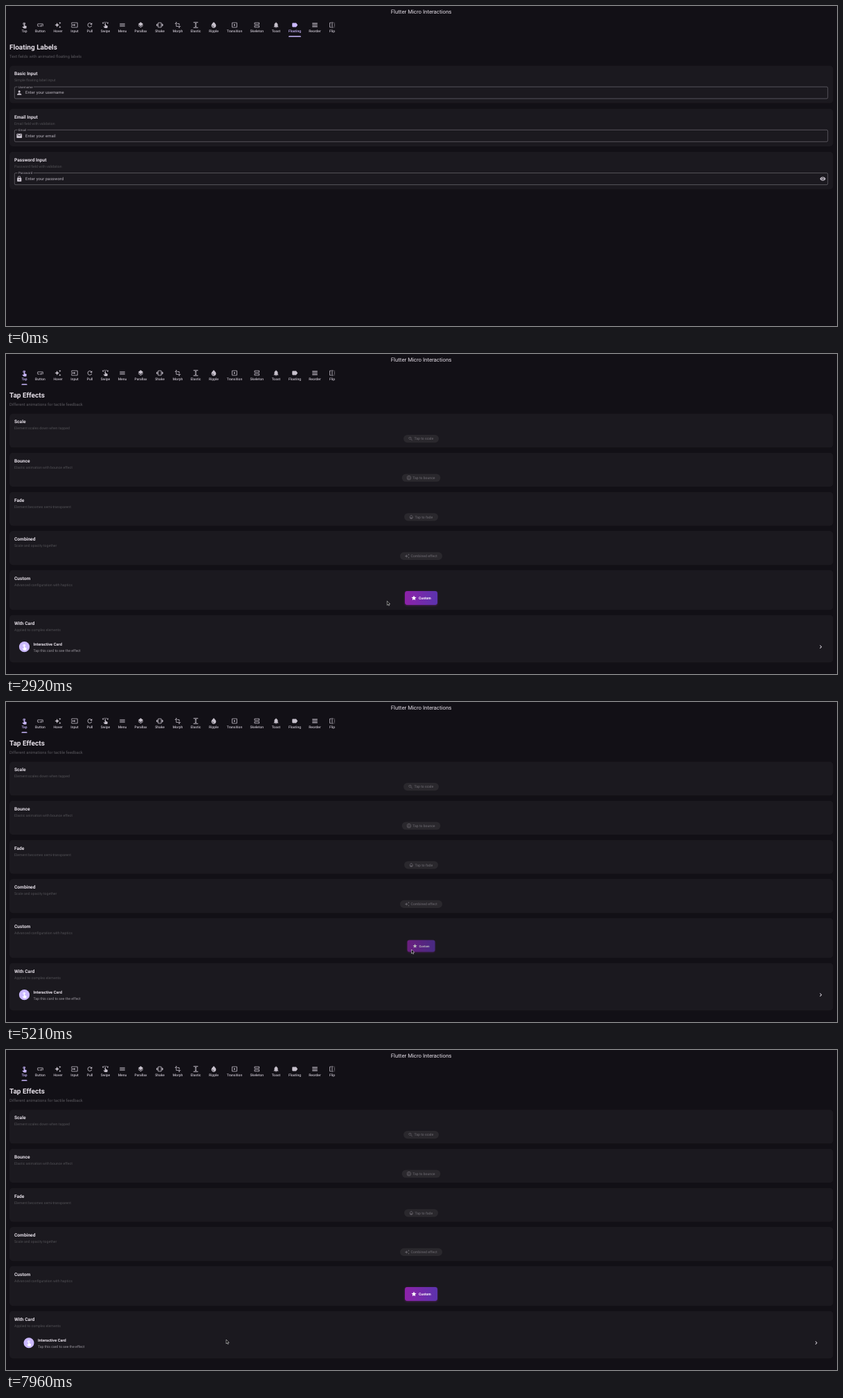
Animation of 1200 by 463 pixels, one loop 8 s. Source, as an HTML page:

```html
<!DOCTYPE html>
<html lang="en">
<head>
<meta charset="utf-8">
<title>Flutter Micro Interactions</title>
<style>
  html, body { margin: 0; height: 100%; overflow: hidden; background: #121016; }
  svg { display: block; width: 100vw; height: 100vh; font-family: Roboto, "Noto Sans", sans-serif; text-rendering: geometricPrecision; }
  path { fill-rule: evenodd; }
  .card { fill: #1b191f; filter: drop-shadow(0 .4px .6px #0006); }
</style>
</head>
<body>
<svg id="stage" viewBox="0 0 1200 463"></svg>
<script>
const PRIMARY = '#cbb9ff', SOFT = '#c6c0cb', LIGHT = '#e6e0e9', CARD = '#1b191f';

// 24-unit icon outlines
const ICONS = {
  touch: 'M9 11.24V7.5C9 6.12 10.12 5 11.5 5S14 6.12 14 7.5v3.74c1.21-.81 2-2.18 2-3.74C16 5.01 13.99 3 11.5 3S7 5.01 7 7.5c0 1.56.79 2.93 2 3.74zm9.84 4.63l-4.54-2.26c-.17-.07-.35-.11-.54-.11H13v-6c0-.83-.67-1.5-1.5-1.5S10 6.67 10 7.5v10.74l-3.43-.72c-.08-.01-.15-.03-.24-.03-.31 0-.59.13-.79.33l-.79.8 4.94 4.94c.27.27.65.44 1.06.44h6.79c.75 0 1.33-.55 1.44-1.28l.75-5.27c.01-.07.02-.14.02-.2 0-.62-.38-1.16-.91-1.38z',
  button: 'M22 9v6c0 1.1-.9 2-2 2h-1v-2h1V9H4v6h6v2H4c-1.1 0-2-.9-2-2V9c0-1.1.9-2 2-2h16c1.1 0 2 .9 2 2zm-7.5 10 1.09-2.41L18 15.5l-2.41-1.09L14.5 12l-1.09 2.41L11 15.5l2.41 1.09L14.5 19zm2.5-5 .62-1.38L19 12l-1.38-.62L17 10l-.62 1.38L15 12l1.38.62L17 14z',
  sparkle: 'M19 9l1.25-2.75L23 5l-2.75-1.25L19 1l-1.25 2.75L15 5l2.75 1.25L19 9zm-7.5.5L9 4 6.5 9.5 1 12l5.5 2.5L9 20l2.5-5.5L17 12l-5.5-2.5zM19 15l-1.25 2.75L15 19l2.75 1.25L19 23l1.25-2.75L23 19l-2.75-1.25L19 15z',
  input: 'M21 3H3c-1.1 0-2 .9-2 2v4h2V5h18v14H3v-4H1v4c0 1.1.9 2 2 2h18c1.1 0 2-.9 2-2V5c0-1.1-.9-2-2-2zM11 16l4-4-4-4v3H1v2h10v3z',
  refresh: 'M17.65 6.35C16.2 4.9 14.21 4 12 4c-4.42 0-7.99 3.58-7.99 8s3.57 8 7.99 8c3.73 0 6.84-2.55 7.73-6h-2.08c-.82 2.33-3.04 4-5.65 4-3.31 0-6-2.69-6-6s2.69-6 6-6c1.66 0 3.14.69 4.22 1.78L13 11h7V4l-2.35 2.35z',
  swipe: 'M18.89 14.75l-4.09-2.04c-.28-.14-.58-.21-.89-.21H13v-6C13 5.67 12.33 5 11.5 5S10 5.67 10 6.5v10.74l-3.25-.74c-.33-.07-.68.03-.92.28l-.83.84 4.54 4.79c.38.38 1.14.59 1.67.59h6.16c1 0 1.84-.73 1.98-1.72l.63-4.46c.12-.85-.32-1.68-1.09-2.07zM20.13 3.87C18.69 2.17 15.6 1 12 1S5.31 2.17 3.87 3.87L2 2v5h5L4.93 4.93c1-1.29 3.7-2.43 7.07-2.43s6.07 1.14 7.07 2.43L17 7h5V2l-1.87 1.87z',
  menu: 'M3 18h18v-2H3v2zm0-5h18v-2H3v2zm0-7v2h18V6H3z',
  layers: 'M11.99 18.54l-7.37-5.73L3 14.07l9 7 9-7-1.63-1.27-7.38 5.74zM12 16l7.36-5.73L21 9l-9-7-9 7 1.63 1.27L12 16z',
  shake: 'M0 15h2V9H0v6zm3 2h2V7H3v10zm19-8v6h2V9h-2zm-3 8h2V7h-2v10zM16.5 3h-9C6.67 3 6 3.67 6 4.5v15c0 .83.67 1.5 1.5 1.5h9c.83 0 1.5-.67 1.5-1.5v-15c0-.83-.67-1.5-1.5-1.5zM16 19H8V5h8v14z',
  morph: 'M22 18v-2H8V4h2L7 1 4 4h2v2H2v2h4v8c0 1.1.9 2 2 2h8v2h-2l3 3 3-3h-2v-2h4zM10 8h6v6h2V8c0-1.1-.9-2-2-2h-6v2z',
  expand: 'M4 20h16v2H4zM4 2h16v2H4zm9 7h3l-4-4-4 4h3v6H8l4 4 4-4h-3z',
  drop: 'M12 2c-5.33 4.55-8 8.48-8 11.8 0 4.98 3.8 8.2 8 8.2s8-3.22 8-8.2c0-3.32-2.67-7.25-8-11.8zM7.83 14c.37 0 .67.26.74.62.41 2.22 2.28 2.98 3.64 2.87.43-.02.79.32.79.75 0 .4-.32.73-.72.75-2.13.13-4.62-1.09-5.19-4.12-.08-.45.28-.87.74-.87z',
  slides: 'M10 8v8l5-4-5-4zm9-5H5c-1.1 0-2 .9-2 2v14c0 1.1.9 2 2 2h14c1.1 0 2-.9 2-2V5c0-1.1-.9-2-2-2zm0 16H5V5h14v14z',
  agenda: 'M19 13H5c-1.1 0-2 .9-2 2v4c0 1.1.9 2 2 2h14c1.1 0 2-.9 2-2v-4c0-1.1-.9-2-2-2zm0 6H5v-4h14v4zm0-16H5c-1.1 0-2 .9-2 2v4c0 1.1.9 2 2 2h14c1.1 0 2-.9 2-2V5c0-1.1-.9-2-2-2zm0 6H5V5h14v4z',
  bell: 'M12 22c1.1 0 2-.9 2-2h-4c0 1.1.89 2 2 2zm6-6v-5c0-3.07-1.64-5.64-4.5-6.32V4c0-.83-.67-1.5-1.5-1.5s-1.5.67-1.5 1.5v.68C7.63 5.36 6 7.92 6 11v5l-2 2v1h16v-1l-2-2z',
  label: 'M17.63 5.84C17.27 5.33 16.67 5 16 5H5C3.9 5 3 5.9 3 7v10c0 1.1.9 2 2 2h11c.67 0 1.27-.33 1.63-.84L22 12l-4.37-6.16z',
  reorder: 'M3 15h18v-2H3v2zm0 4h18v-2H3v2zm0-8h18V9H3v2zm0-6v2h18V5H3z',
  flip: 'M15 21h2v-2h-2v2zm4-12h2V7h-2v2zM3 5v14c0 1.1.9 2 2 2h4v-2H5V5h4V3H5c-1.1 0-2 .9-2 2zm16-2v2h2c0-1.1-.9-2-2-2zm-8 20h2V1h-2v22zm8-6h2v-2h-2v2zM15 5h2V3h-2v2zm4 8h2v-2h-2v2zm0 8c1.1 0 2-.9 2-2h-2v2z',
  person: 'M12 12c2.21 0 4-1.79 4-4s-1.79-4-4-4-4 1.79-4 4 1.79 4 4 4zm0 2c-2.67 0-8 1.34-8 4v2h16v-2c0-2.66-5.33-4-8-4z',
  mail: 'M20 4H4c-1.1 0-2 .9-2 2v12c0 1.1.9 2 2 2h16c1.1 0 2-.9 2-2V6c0-1.1-.9-2-2-2zm0 4l-8 5-8-5V6l8 5 8-5v2z',
  lock: 'M18 8h-1V6c0-2.76-2.24-5-5-5S7 3.24 7 6v2H6c-1.1 0-2 .9-2 2v10c0 1.1.9 2 2 2h12c1.1 0 2-.9 2-2V10c0-1.1-.9-2-2-2zm-6 9c-1.1 0-2-.9-2-2s.9-2 2-2 2 .9 2 2-.9 2-2 2zm3.1-9H8.9V6c0-1.71 1.39-3.1 3.1-3.1 1.71 0 3.1 1.39 3.1 3.1v2z',
  eye: 'M12 4.5C7 4.5 2.73 7.61 1 12c1.73 4.39 6 7.5 11 7.5s9.27-3.11 11-7.5c-1.73-4.39-6-7.5-11-7.5zM12 17c-2.76 0-5-2.24-5-5s2.24-5 5-5 5 2.24 5 5-2.24 5-5 5zm0-8c-1.66 0-3 1.34-3 3s1.34 3 3 3 3-1.34 3-3-1.34-3-3-3z',
  zoom: 'M15.5 14h-.79l-.28-.27C15.41 12.59 16 11.11 16 9.5 16 5.91 13.09 3 9.5 3S3 5.91 3 9.5 5.91 16 9.5 16c1.61 0 3.09-.59 4.23-1.57l.27.28v.79l5 4.99L20.49 19l-4.99-5zm-6 0C7.01 14 5 11.99 5 9.5S7.01 5 9.5 5 14 7.01 14 9.5 11.99 14 9.5 14zM7 9h5v1H7z',
  ball: 'M12 2a10 10 0 1 0 0 20 10 10 0 1 0 0-20zm0 2a8 8 0 1 1 0 16 8 8 0 1 1 0-16zM11 4h2v16h-2zM4 11h7v2H4zM13 11h7v2h-7z',
  opacity: 'M17.66 8L12 2.35 6.34 8C4.78 9.56 4 11.64 4 13.64s.78 4.11 2.34 5.67 3.61 2.35 5.66 2.35 4.1-.79 5.66-2.35S20 15.64 20 13.64 19.22 9.56 17.66 8zM6 14c.01-2 .62-3.27 1.76-4.4L12 5.27l4.24 4.38C17.38 10.77 17.99 12 18 14H6z',
  star: 'M12 17.27L18.18 21l-1.64-7.03L22 9.24l-7.19-.61L12 2 9.19 8.63 2 9.24l5.46 4.73L5.82 21z',
  chevron: 'M10 6L8.59 7.41 13.17 12l-4.58 4.59L10 18l6-6z'
};

const TABS = [
  ['Tap', 'touch', 26.5], ['Button', 'button', 49.5], ['Hover', 'sparkle', 75], ['Input', 'input', 99],
  ['Pull', 'refresh', 121], ['Swipe', 'swipe', 143.5], ['Menu', 'menu', 168], ['Parallax', 'layers', 194.5],
  ['Shake', 'shake', 222], ['Morph', 'morph', 248], ['Elastic', 'expand', 274], ['Ripple', 'drop', 300],
  ['Transition', 'slides', 330], ['Skeleton', 'agenda', 362.3], ['Toast', 'bell', 390], ['Floating', 'label', 417],
  ['Reorder', 'reorder', 446], ['Flip', 'flip', 471]
];

// Markup helpers
const icon = (name, x, y, size, fill = '') =>
  `<path d="${ICONS[name]}" ${fill && `fill="${fill}"`} transform="translate(${x - size / 2} ${y - size / 2}) scale(${size / 24})"/>`;
const text = (str, x, y, size, fill, weight = 400, extra = '') =>
  `<text x="${x}" y="${y}" font-size="${size}" ${fill && `fill="${fill}"`} font-weight="${weight}" ${extra}>${str}</text>`;
const rect = (x, y, w, h, r, attrs) =>
  `<rect x="${x}" y="${y}" width="${w}" height="${h}" rx="${r}" ${attrs}/>`;
const MIDDLE = 'text-anchor="middle"';

const heading = (title, sub) =>
  text(title, 5, 62.8, 10.05, LIGHT, 600) + text(sub, 5, 75.1, 5.92, '#5a585e');
const card = (y, h, title, sub) =>
  rect(5, y, 1189.5, h, 5, 'class="card"') +
  text(title, 12, y + 14.1, 6.66, LIGHT, 600) + text(sub, 12, y + 23.2, 5.2, '#515055');

const field = (i, name, sub, label, hint, glyph) => {
  const y = 86.2 + i * 62.3;
  return card(y, 54.6, name, sub) +
    rect(12.3, y + 30.8, 1174.4, 17, 1.7, 'fill="none" stroke="#7f7b84" stroke-width=".6"') +
    text(label, 18, y + 32.4, 4.45, '#a9a4ae', 400, `letter-spacing=".08" stroke="${CARD}" stroke-width="3" paint-order="stroke"`) +
    icon(glyph, 19.2, y + 39.3, 9.4, SOFT) +
    text(hint, 28, y + 41.2, 5.88, '#bab5bf', 400, 'letter-spacing=".1"');
};

const chip = (i, title, sub, label, glyph, width) => {
  const y = 86.2 + i * 56.6, left = 599.5 - width / 2;
  return card(y, 49.4, title, sub) +
    rect(left, y + 30.8, width, 11.2, 5.6, 'fill="#2a282d"') +
    icon(glyph, left + 10.2, y + 36.4, 7.4, '#625f66') +
    text(label, left + 15.6, y + 38.2, 5.12, '#625f66', 500);
};

const floatingPage = heading('Floating Labels', 'Text fields with animated floating labels') +
  field(0, 'Basic Input', 'Simple floating label input', 'Username', 'Enter your username', 'person') +
  field(1, 'Email Input', 'Email field with validation', 'Email', 'Enter your email', 'mail') +
  field(2, 'Password Input', 'Password field with validation', 'Password', 'Enter your password', 'lock') +
  icon('eye', 1179.5, 250.1, 9, SOFT);

const tapPage = heading('Tap Effects', 'Different animations for tactile feedback') +
  chip(0, 'Scale', 'Element scales down when tapped', 'Tap to scale', 'zoom', 51) +
  chip(1, 'Bounce', 'Elastic animation with bounce effect', 'Tap to bounce', 'ball', 55.6) +
  chip(2, 'Fade', 'Element becomes semi-transparent', 'Tap to fade', 'opacity', 49) +
  chip(3, 'Combined', 'Scale and opacity together', 'Combined effect', 'sparkle', 61) +
  card(312.4, 58, 'Custom', 'Advanced configuration with haptics') +
  card(377.4, 69, 'With Card', 'Applied to complex elements') +
  `<g id="custom">${rect(576, 343, 47, 20, 3.4, 'fill="url(#purple)" style="filter:drop-shadow(0 1.2px 1.5px #9c27b066)"')}
    ${icon('star', 589, 353, 8.6, '#fff')}${text('Custom', 596, 354.9, 5.1, '#fff', 700)}</g>
  <g id="tile"><circle cx="26.5" cy="423.7" r="7.6" fill="${PRIMARY}"/>${icon('touch', 26.5, 423.7, 9.6, '#fff')}
    ${text('Interactive Card', 39.5, 421.7, 5.8, LIGHT, 600)}
    ${text('Tap this card to see the effect', 39.5, 430.6, 5.18, '#9b979f')}
    ${icon('chevron', 1176.5, 423.7, 10, LIGHT)}</g>`;

stage.innerHTML = `<defs><linearGradient id="purple"><stop stop-color="#8d22a8"/><stop offset="1" stop-color="#5b33ad"/></linearGradient></defs>
  ${text('Flutter Micro Interactions', 599.5, 10.7, 7.84, LIGHT, 400, MIDDLE)}
  ${rect(16, 18, 21, 27, 0, `id="hover" fill="${PRIMARY}"`)}
  ${TABS.map(([name, glyph, x], i) => `<g id="tab${i}" fill="${SOFT}">${icon(glyph, x, 27.5, 10)}${text(name, x, 37.7, 5, '', 500, MIDDLE)}</g>`).join('')}
  <path id="bar" fill="${PRIMARY}"/>
  <g id="floating">${floatingPage}</g><g id="tap">${tapPage}</g>
  <path id="arrow" d="M0 0V6l1.4-1.3.9 2 .9-.4-.9-2h1.9z" fill="#000" stroke="#fff" stroke-width=".5"/>
  <path id="hand" d="M1.4 0a.7.7 0 0 1 .7.7v1.9l2.2.6q.6.2.5.9l-.5 2.4H1.6L-.2 4.2q.3-.6.9-.1V.7a.7.7 0 0 1 .7-.7z" fill="#fff" stroke="#000" stroke-width=".3"/>`;

const $ = id => document.getElementById(id);
const lerp = (a, b, p) => a + (b - a) * p;
const ramp = (t, from, to) => Math.min(1, Math.max(0, (t - from) / (to - from)));
const smooth = p => p * p * (3 - 2 * p);
const pulse = (t, down, up, ms) => smooth(ramp(t, down, down + ms)) - smooth(ramp(t, up, up + ms));

// cubic-bezier(.25, .1, .25, 1)
function ease(x) {
  if (x <= 0 || x >= 1) return x;
  let lo = 0, hi = 1, u;
  for (let i = 0; i < 24; i++) {
    u = (lo + hi) / 2;
    if (.75 * u * (1 - u) + u ** 3 < x) lo = u; else hi = u;
  }
  return .3 * u * (1 - u) ** 2 + 3 * u * u * (1 - u) + u ** 3;
}

// Pointer stops: time, x, y
const STOPS = [
  [580, 420, 216], [1290, 22.5, 38], [1580, 22.5, 38], [1750, 28.5, 38.4], [2350, 28.5, 38.4], [3000, 572.5, 371],
  [3830, 572.5, 371], [4100, 585.5, 358], [5400, 585.5, 358], [6040, 516, 404], [6420, 518, 408],
  [6830, 518, 408], [7040, 325.3, 419], [7140, 318, 419]
];
function pointer(t) {
  const i = STOPS.findIndex(s => s[0] > t);
  if (i < 0) return STOPS.at(-1).slice(1);
  const [t0, x0, y0] = STOPS[i - 1], [t1, x1, y1] = STOPS[i], p = smooth(ramp(t, t0, t1));
  return [lerp(x0, x1, p), lerp(y0, y1, p)];
}

const scaleAt = (x, y, s) => `translate(${x} ${y}) scale(${s}) translate(${-x} ${-y})`;
const tint = (id, p) => $(id).style.fill = `color-mix(in srgb, ${PRIMARY} ${p * 100}%, ${SOFT})`;

function draw(t) {
  const p = ease(ramp(t, 1895, 2195));
  $('floating').setAttribute('transform', `translate(${1200 * p})`);
  $('tap').setAttribute('transform', `translate(${1200 * (p - 1)})`);
  $('floating').style.display = p < 1 ? '' : 'none';
  $('tap').style.display = p > 0 ? '' : 'none';
  tint('tab0', p);
  tint('tab15', 1 - p);

  // The underline stretches: its leading edge decelerates, the trailing one accelerates
  const left = lerp(408, 22.4, Math.sin(p * Math.PI / 2));
  const right = lerp(426, 30.6, 1 - Math.cos(p * Math.PI / 2));
  $('bar').setAttribute('d', `M${left} 44.7v-.2q0-1.3 1.3-1.3H${right - 1.3}q1.3 0 1.3 1.3v.2z`);
  $('hover').setAttribute('opacity', .13 * pulse(t, 1895, 2400, 90));

  const press = pulse(t, 4150, 4320, 110) + pulse(t, 5080, 5280, 110);
  $('custom').setAttribute('transform', scaleAt(599.5, 353, 1 - .15 * press));
  $('custom').setAttribute('opacity', 1 - .3 * press);
  $('tile').setAttribute('transform', scaleAt(599.5, 423.7, 1 - .0114 * smooth(ramp(t, 7400, 7550))));

  const shown = t >= 580, onTab = t >= 1700 && t < 2400;
  $('arrow').style.display = shown && !onTab ? '' : 'none';
  $('hand').style.display = onTab ? '' : 'none';
  if (shown) {
    const move = `translate(${pointer(t)})`;
    $('arrow').setAttribute('transform', move);
    $('hand').setAttribute('transform', move);
  }
}

const start = performance.now();
function tick() {
  draw((performance.now() - start) % 8000);
  requestAnimationFrame(tick);
}
tick();
</script>
</body>
</html>
```
